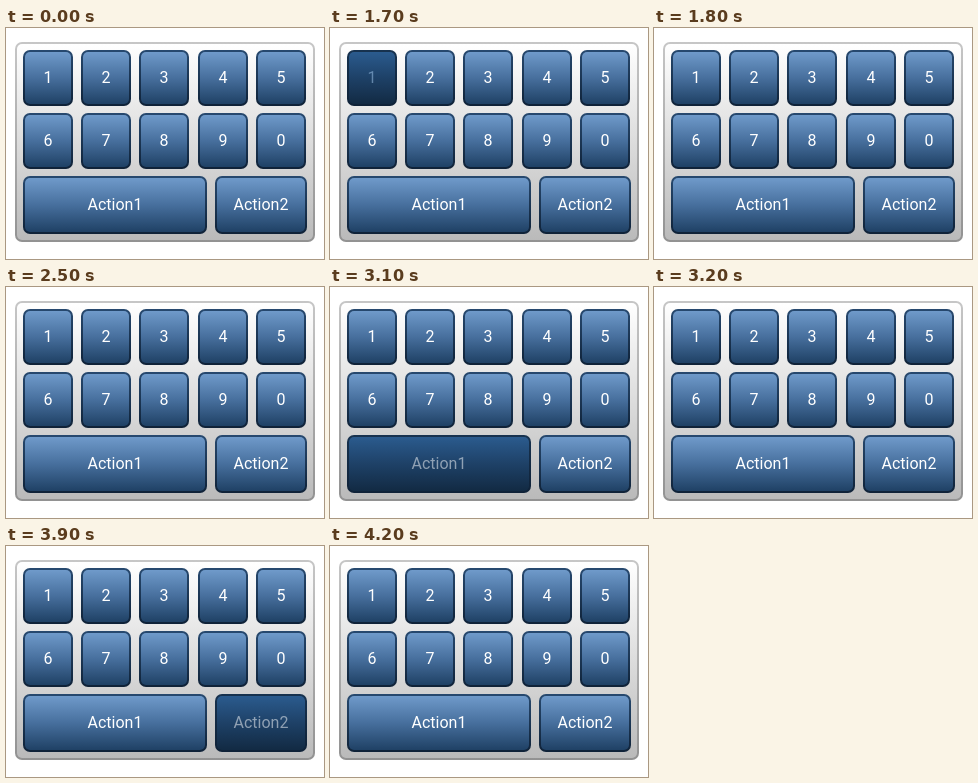
Animation of 318 by 231 pixels, one loop 5.1 s. Source, as an HTML page:

```html
<!DOCTYPE html>
<html lang="en">
<head>
<meta charset="utf-8">
<title>Keypad</title>
<style>
  html, body { margin: 0; width: 100%; height: 100%; overflow: hidden; background: #fff; }
  svg { display: block; width: 318px; height: 231px; }
  text { font: 16px Roboto, Arial, sans-serif; text-anchor: middle; fill: #fff; }
  .down text { fill: #fff; fill-opacity: .5; }
  .down.digit text { fill: #a8cdf2; }
</style>
</head>
<body>
<svg id="pad" viewBox="0 0 318 231"><defs></defs></svg>
<script>
const LOOP = 5100;
const pad = document.getElementById('pad');

function add(parent, tag, attrs, label) {
  const node = document.createElementNS('http://www.w3.org/2000/svg', tag);
  for (const name in attrs) node.setAttribute(name, attrs[name]);
  if (label) node.textContent = label;
  return parent.appendChild(node);
}

// Vertical gradients: id -> evenly spaced colours
const gradients = {
  panelEdge: ['#c6c6c6', '#929292'],
  panelFace: ['#ffffff', '#bababa'],
  upEdge: ['#27496f', '#0f2238'],
  upFace: ['#6f9aca', '#476f9d', '#1f4165'],
  downEdge: ['#17324f', '#0f2238'],
  downFace: ['#2b5b8e', '#1e4167', '#122a43']
};
for (const id in gradients) {
  const grad = add(pad.querySelector('defs'), 'linearGradient', { id, x1: 0, y1: 0, x2: 0, y2: 1 });
  gradients[id].forEach((color, i, all) =>
    add(grad, 'stop', { offset: i / (all.length - 1), 'stop-color': color }));
}

function box(parent, x, y, w, h, r, style) {
  add(parent, 'rect', { x, y, width: w, height: h, rx: r, fill: `url(#${style}Edge)` });
  add(parent, 'rect', {
    x: x + 2, y: y + 2, width: w - 4, height: h - 4, rx: r - 2, fill: `url(#${style}Face)`
  });
}

// Shows a group only between two moments of the loop
function showDuring(node, from, to, inside, outside) {
  node.animate([
    { opacity: outside, offset: 0, easing: 'step-end' },
    { opacity: inside, offset: from / LOOP, easing: 'step-end' },
    { opacity: outside, offset: to / LOOP, easing: 'step-end' },
    { opacity: outside, offset: 1 }
  ], { duration: LOOP, iterations: Infinity });
}

const presses = {
  1: [1700, 1800],
  2: [2400, 2500],
  Action1: [3100, 3200],
  Action2: [3900, 4200]
};

function face(style, label, x, y, w, h) {
  const kind = label.length > 1 ? 'action' : 'digit';
  const group = add(pad, 'g', { class: `${style} ${kind}` });
  box(group, x, y, w, h, 7, style);
  add(group, 'text', { x: x + w / 2, y: y + h / 2 + 5 }, label);
  return group;
}

function key(label, ...place) {
  const up = face('up', label, ...place);
  const press = presses[label];
  if (!press) return;
  showDuring(up, ...press, 0, 1);
  showDuring(face('down', label, ...place), ...press, 1, 0);
}

box(pad, 9, 14, 300, 200, 7, 'panel');
const columns = [17, 75, 133, 192, 250];
['12345', '67890'].forEach((row, r) =>
  [...row].forEach((digit, c) => key(digit, columns[c], 22 + r * 63, 50, 56)));
key('Action1', 17, 148, 184, 58);
key('Action2', 209, 148, 92, 58);
</script>
</body>
</html>
```
